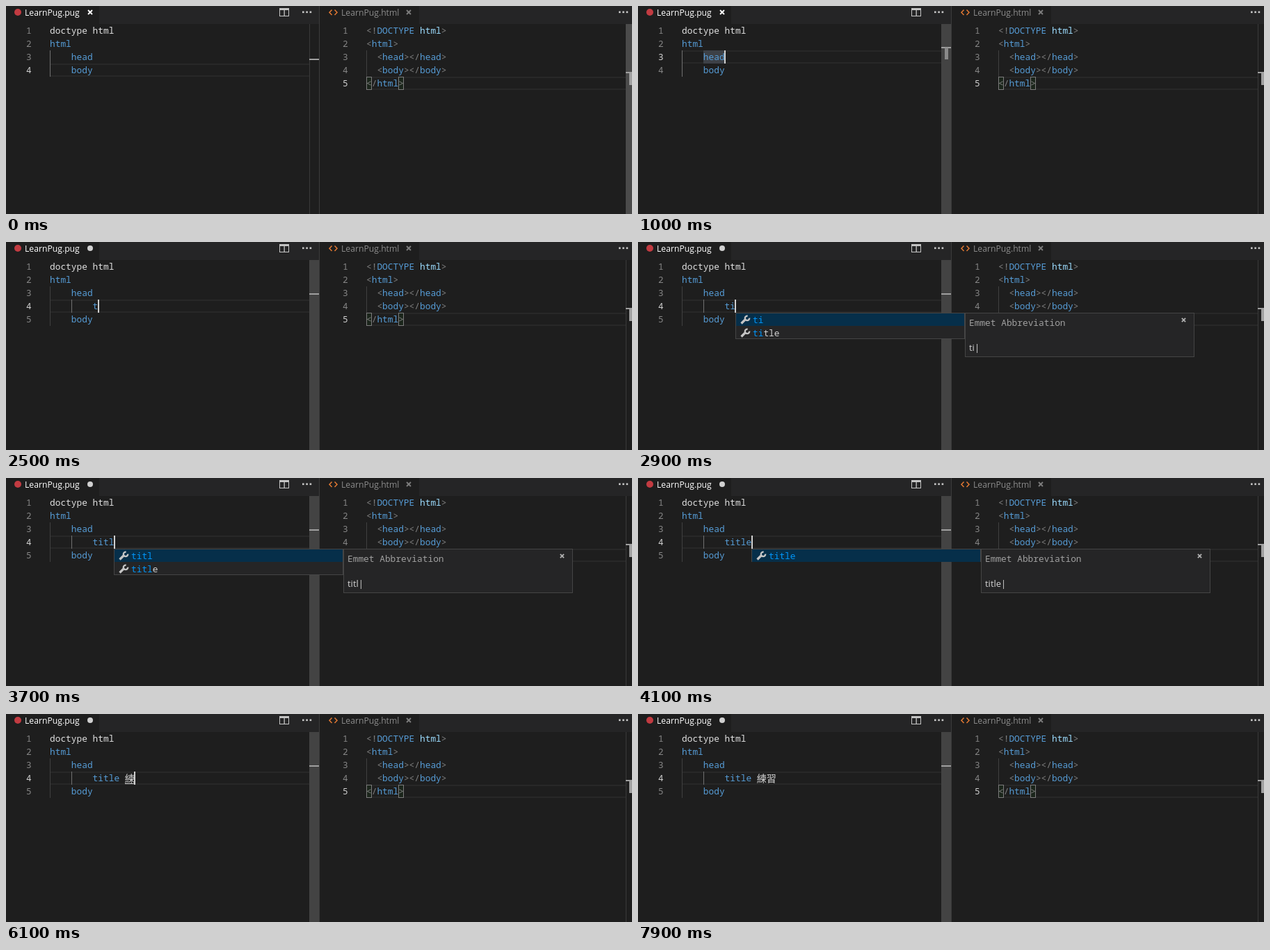
Recreate the animation shown at these times as an HTML page. Size 900x300 px, loop 8 s.

```html
<!DOCTYPE html>
<html lang="en">
<head>
<meta charset="utf-8">
<title>Pug editor</title>
<style>
html, body { margin: 0; width: 100%; height: 100%; overflow: hidden; background: #1e1e1e; }
svg { display: block; width: 900px; height: 300px; }
text { white-space: pre; }
.mono { font: 12.83px "Noto Sans Mono", monospace; }
.ui { font: 12.2px "Open Sans", sans-serif; }
.doc { font: 13px "Open Sans", sans-serif; }
.cjk { font: 14px "Noto Sans CJK TC", "Noto Sans CJK JP", "Noto Sans CJK", sans-serif; }
</style>
</head>
<body>
<svg id="stage" viewBox="0 0 900 300"></svg>
<script>
const LOOP = 8000, CH = 7.7, WIDE = 14, ROW = 19, TOP = 26, LEFT = 63, RIGHT = 518;
const BLUE = '#569cd6', GREY = '#808080', PLAIN = '#d4d4d4', PALE = '#9cdcfe';
const TAGS = ['table', 'tarea', 'tbody', 'td', 'textarea', 'tfoot', 'th', 'thead', 'title', 'tr', 'track'];

// [start time, typed text]
const TYPED = [[2500, 't'], [2900, 'ti'], [3300, 'tit'], [3700, 'titl'], [4100, 'title'], [4500, 'title ']];
const INPUT = [[5400, 'ㄌ'], [5800, 'ㄌㄧ'], [5900, 'ㄌㄧㄢ'], [6100, '練'], [6600, '練ㄒ'], [6800, '練ㄒㄧ'], [7100, '練習']];
const BLINKS = [[0, 700], [1200, 1500], [2300, 2500], [5000, 5400], [7900, 8000]];
const FADE = [[0, 1], [100, .7], [200, .4], [300, .12], [800, 0]];

const at = (steps, t, none) => steps.reduce((v, [from, next]) => t >= from ? next : v, none);
const rowY = line => TOP + (line - 1) * ROW;
const esc = s => s.replace(/&/g, '&amp;').replace(/</g, '&lt;');
const rect = (x, y, w, h, fill, extra = '') =>
  `<rect x="${x}" y="${y}" width="${w}" height="${h}" fill="${fill}" ${extra}/>`;
const frame = (x, y, w, h, fill, stroke) =>
  rect(x + .5, y + .5, w - 1, h - 1, fill, `stroke="${stroke}"`);
const path = (d, stroke, width) =>
  `<path d="${d}" fill="none" stroke="${stroke}" stroke-width="${width}"/>`;
const dot = (x, y, r, fill) => `<circle cx="${x}" cy="${y}" r="${r}" fill="${fill}"/>`;
const text = (x, y, s, fill, cls = 'mono', extra = '') =>
  `<text x="${x}" y="${y}" class="${cls}" fill="${fill}" ${extra}>${esc(s)}</text>`;
const cross = (x, y, r, color) =>
  path(`M${x - r} ${y - r}l${2 * r} ${2 * r}m0 ${-2 * r}l${-2 * r} ${2 * r}`, color, 1.9);
const dots = x => [0, 5.3, 10.6].map(d => rect(x + d, 7.5, 2.6, 2.6, '#c5c5c5')).join('');

// Parts are [text, colour] pairs laid out on the character grid.
function code(x, line, ...parts) {
  let out = '';
  for (const [s, color] of parts) {
    out += text(x, rowY(line) + 14, s, color);
    x += s.length * CH;
  }
  return out;
}

function numbers(x, count, active) {
  let out = '';
  for (let n = 1; n <= count; n++)
    out += text(x, rowY(n) + 14, n + '', n === active ? '#d0d0d0' : '#858585', 'mono', n === active ? 'font-weight="600"' : '');
  return out;
}

const lineBorder = (x, end, line) =>
  rect(x, rowY(line), end - x, 2, '#282828') + rect(x, rowY(line) + ROW - 2, end - x, 2, '#282828');

function tabs() {
  return rect(0, 0, 900, TOP, '#252526') + rect(0, 0, 134, TOP, '#1e1e1e') + rect(451, 0, 143, TOP, '#1e1e1e') +
    dot(17, 9, 5, '#c23b41') + text(27, 14, 'LearnPug.pug', '#ffffff', 'ui') +
    path('M468.5 5.5l-3.5 3.7 3.5 3.7m4-7.4l3.5 3.7-3.5 3.7', '#e37933', 1.5) +
    text(482, 14, 'LearnPug.html', '#8c8c8c', 'ui') + cross(579, 9, 3, '#7d7d7d') +
    frame(393, 3, 14, 12, 'none', '#c5c5c5') + rect(393, 3, 14, 3, '#c5c5c5') + rect(399.5, 4, 1.3, 11, '#c5c5c5') +
    dots(426) + dots(881) + rect(450, 0, 1, 300, '#3c3c3c');
}

function htmlPane(fade) {
  const pair = name => [['  ', GREY], ['<', GREY], [name, BLUE], ['></', GREY], [name, BLUE], ['>', GREY]];
  const match = x => frame(x, rowY(5), 8, ROW, '#1b251b', '#7c7c7c');
  return lineBorder(RIGHT, 891, 5) + numbers(484, 5, 5) + rect(RIGHT, rowY(3), 1, 2 * ROW, '#404040') +
    match(RIGHT) + match(564) +
    code(RIGHT, 1, ['<!', GREY], ['DOCTYPE', BLUE], [' html', PALE], ['>', GREY]) +
    code(RIGHT, 2, ['<', GREY], ['html', BLUE], ['>', GREY]) +
    code(RIGHT, 3, ...pair('head')) + code(RIGHT, 4, ...pair('body')) +
    code(RIGHT, 5, ['</', GREY], ['html', BLUE], ['>', GREY]) +
    rect(891, TOP, 1, 274, '#3a3a3a') + rect(891, TOP, 9, 274, '#4b4b4b', `opacity="${fade}"`) +
    rect(891, 95, 9, 2, '#a0a0a0') + rect(896, 95, 4, 19, '#a0a0a0');
}

function pugPane(t, typed, input) {
  const split = t >= 1500, marked = t >= 1000 && !split;
  const line = t >= 700 && !split ? 3 : 4;
  const last = split ? 5 : 4;
  const nested = typed !== '';
  const inputX = LEFT + 14 * CH;
  let out = lineBorder(LEFT, 436, line) + numbers(29, last, line);

  if (marked) out += rect(94, rowY(3), 31, ROW, '#3d4147');
  out += rect(LEFT, rowY(3), 1, (last - 2) * ROW, nested ? '#404040' : '#707070');
  if (nested) out += rect(94, rowY(4), 1, ROW, '#707070');
  out += code(LEFT, 1, ['doctype html', '#e0e0e0']) + code(LEFT, 2, ['html', BLUE]) +
    code(LEFT + 4 * CH, 3, ['head', BLUE]) + code(LEFT + 4 * CH, last, ['body', BLUE]) +
    code(LEFT + 8 * CH, 4, [typed, BLUE]);

  [...input].forEach((c, i) => { out += text(inputX + i * WIDE, rowY(4) + 15, c, PLAIN, 'cjk'); });
  if (input && t < 7500) out += rect(171, 100, input.length * WIDE - 1, 1, PLAIN);

  const col = t < 1500 || t >= 1800 ? 8 : 4;
  const caret = LEFT + (col + typed.length) * CH + input.length * WIDE;
  if (!BLINKS.some(([a, b]) => t >= a && t < b))
    out += rect(Math.round(caret - .6), rowY(line), 2, ROW, '#d0d0d0');

  out += rect(436, TOP, 1, 274, '#3a3a3a') +
    rect(436, TOP, 14, 274, '#434343', `opacity="${Math.min(1, Math.floor(t / 100) / 3)}"`);
  out += rect(436, split ? 74 : line === 3 ? 59 : 76, 14, 2, '#a0a0a0');
  if (marked) out += rect(441, 60, 5, 17, '#8a8a8a');
  return out + (split ? dot(121, 9, 4, '#d0d0d0') : cross(121, 9, 3, '#ffffff'));
}

const wrench = (x, y) =>
  path(`M${x + 1.5} ${y + 11.5}l6.5 -6.5`, '#c5c5c5', 3.2) +
  path(`M${x + 10.6} ${y + .8}a3.2 3.2 0 1 0 2.6 2.9`, '#c5c5c5', 2.4);

function popup(typed) {
  const word = typed.trim();
  const x = Math.round(LEFT + (8 + typed.length) * CH), y = 102, side = x + 330;
  const items = [word, ...TAGS.filter(s => s !== word && s.startsWith(word))];
  let out = frame(x, y, 330, items.length * ROW, '#252526', '#454545') + rect(x + 1, y + 1, 328, ROW - 1, '#062f4a');
  items.forEach((s, i) => {
    const base = y + i * ROW + 15;
    out += wrench(x + 7, base - 11) + text(x + 25, base, word, '#0097fb', 'mono', 'font-weight="700"') +
      text(x + 25 + word.length * CH, base, s.slice(word.length), PLAIN);
  });
  return out + frame(side, y, 330, 64, '#252526', '#454545') +
    text(side + 6, 121, 'Emmet Abbreviation', '#a0a0a0') + cross(side + 314.5, 112.5, 2.6, '#b0b0b0') +
    text(side + 6, 157, word + '|', PLAIN, 'doc');
}

const stage = document.getElementById('stage');
let shown = '';

function render(t) {
  const typed = at(TYPED, t, ''), input = at(INPUT, t, '');
  const open = t >= 2600 && t < 4600;
  const next = rect(0, 0, 900, 300, '#1e1e1e') + tabs() + htmlPane(at(FADE, t, 1)) +
    pugPane(t, typed, input) + (open ? popup(typed) : '');
  if (next !== shown) stage.innerHTML = shown = next;
}

const start = performance.now();
function tick() {
  render((performance.now() - start) % LOOP);
  requestAnimationFrame(tick);
}
tick();
</script>
</body>
</html>
```
